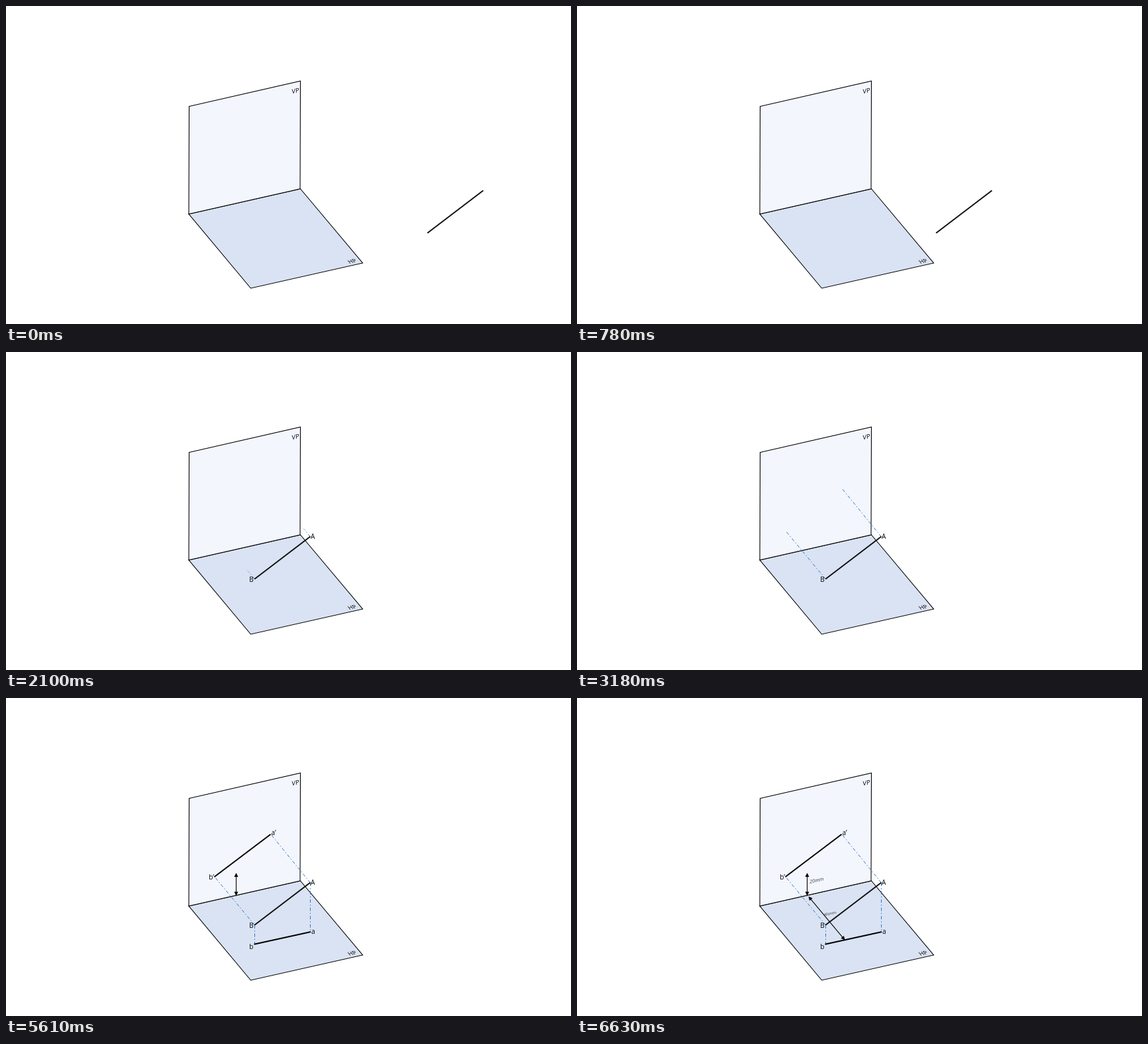
Write an HTML page with a canvas that moves like this. It is 853 by 480 pixels and loops after 6.69 s.

```html
<!DOCTYPE html>
<html>
<head>
<meta charset="utf-8">
<style>
html, body { margin: 0; width: 100%; height: 100%; overflow: hidden; background: #fff; }
canvas { display: block; }
</style>
</head>
<body>
<canvas id="stage" width="853" height="480"></canvas>
<script>
const ctx = document.getElementById('stage').getContext('2d');
const LOOP = 6690, SOFT = 0.15, BLUE = '46,117,206', BLACK = '0,0,0';
const RUNS = [[0, 3180], [3440, 4820], [4950, 5610], [5730, 6630]];
const WALL = [0.975, -0.222, 0, 1], FLOOR = [0.975, -0.222, 0.64, 0.77];
const clamp = (v, lo = 0, hi = 1) => Math.min(hi, Math.max(lo, v));

// The picture advances in 60 ms steps with a few pauses between runs.
function stepTime(t) {
  const [start, end] = RUNS.filter(r => r[0] <= t).pop();
  return Math.min(end, start + Math.floor((t - start) / 60) * 60);
}

function ease(u) {
  u = clamp(u);
  return u < 0.5 ? 2 * u * u : 1 - 2 * (1 - u) ** 2;
}

function plane(fill, ...points) {
  ctx.beginPath();
  points.forEach(p => ctx.lineTo(...p));
  ctx.closePath();
  ctx.fillStyle = fill;
  ctx.fill();
  ctx.strokeStyle = '#000';
  ctx.lineWidth = 1.1;
  ctx.stroke();
}

function line(x1, y1, x2, y2, width, paint) {
  ctx.beginPath();
  ctx.moveTo(x1, y1);
  ctx.lineTo(x2, y2);
  ctx.lineWidth = width;
  ctx.strokeStyle = paint;
  ctx.stroke();
}

function label(text, x, y, size = 10, matrix = [1, 0, 0, 1], color = '#000') {
  ctx.save();
  ctx.transform(...matrix, x, y);
  ctx.font = `${size}px "Open Sans", "Noto Sans", sans-serif`;
  ctx.fillStyle = color;
  ctx.fillText(text, 0, 0);
  ctx.restore();
}

// Paint that is opaque up to a soft edge travelling from the first point to the second.
function wipe(x1, y1, x2, y2, progress, rgb) {
  const edge = progress * (1 + SOFT);
  const paint = ctx.createLinearGradient(x1, y1, x2, y2);
  for (const q of [0, clamp(edge - SOFT), clamp(edge), 1])
    paint.addColorStop(q, `rgba(${rgb},${clamp((edge - q) / SOFT)})`);
  return paint;
}

function projector(x1, y1, x2, y2, progress) {
  if (progress <= 0) return;
  ctx.setLineDash([5, 3, 1.5, 3]);
  line(x1, y1, x2, y2, 1, wipe(x1, y1, x2, y2, progress, BLUE));
  ctx.setLineDash([]);
}

function arrow(x1, y1, x2, y2, progress) {
  if (progress <= 0) return;
  const paint = wipe(x1, y1, x2, y2, progress, BLACK);
  const length = Math.hypot(x2 - x1, y2 - y1);
  const ux = (x2 - x1) / length, uy = (y2 - y1) / length;
  line(x1 + ux * 4, y1 + uy * 4, x2 - ux * 4, y2 - uy * 4, 1.1, paint);
  ctx.fillStyle = paint;
  for (const [x, y, s] of [[x1, y1, 6], [x2, y2, -6]]) {
    ctx.beginPath();
    ctx.moveTo(x, y);
    ctx.lineTo(x + ux * s - uy * 3, y + uy * s + ux * 3);
    ctx.lineTo(x + ux * s + uy * 3, y + uy * s - ux * 3);
    ctx.fill();
  }
}

function draw(t) {
  const during = (start, length) => clamp((t - start) / length);
  ctx.clearRect(0, 0, 853, 480);

  plane('#dae3f3', [276, 314], [444.5, 276], [538.5, 388], [369.5, 426]);
  plane('#f3f6fc', [276.5, 151.5], [444.5, 113.3], [444, 276], [276, 314]);
  label('VP', 431.5, 132.5, 9.3, WALL);
  label('HP', 518.8, 389, 9, FLOOR);

  const toWall = during(1835, 1335), toFloor = during(3485, 1335);
  projector(459.5, 279, 400, 206, toWall);
  projector(375.5, 343, 315, 270, toWall);
  projector(459.5, 279, 459.5, 353, toFloor);
  projector(375.5, 343, 375.5, 371.5, toFloor);

  const dx = 261 * (1 - ease((t - 91) / 1623));
  line(375.2 + dx, 342.7, 459.5 + dx, 278.5, 2, '#111');

  if (t >= 1800) {
    label('A', 460, 282.3);
    label('B', 367.3, 347);
  }
  if (t >= 3440) {
    line(314.5, 270, 399.5, 205.7, 2, '#000');
    label('a’', 400.5, 207.3);
    label('b’', 306.3, 274);
  }
  if (t >= 4820) {
    line(374.5, 371.7, 460, 353, 2, '#000');
    label('a', 461, 356.3);
    label('b', 367.3, 379);
  }

  arrow(347.5, 298.5, 347.5, 264, during(4910, 700));
  if (t >= 5730) label('20mm', 351.3, 280, 7.2, WALL, '#333');
  arrow(349.5, 299.5, 404.5, 365.5, during(5720, 840));
  if (t >= 6570) label('40mm', 374.5, 329, 6.2, FLOOR, '#333');
}

const origin = performance.now();
function tick() {
  draw(stepTime((performance.now() - origin) % LOOP));
  requestAnimationFrame(tick);
}
tick();
</script>
</body>
</html>
```
